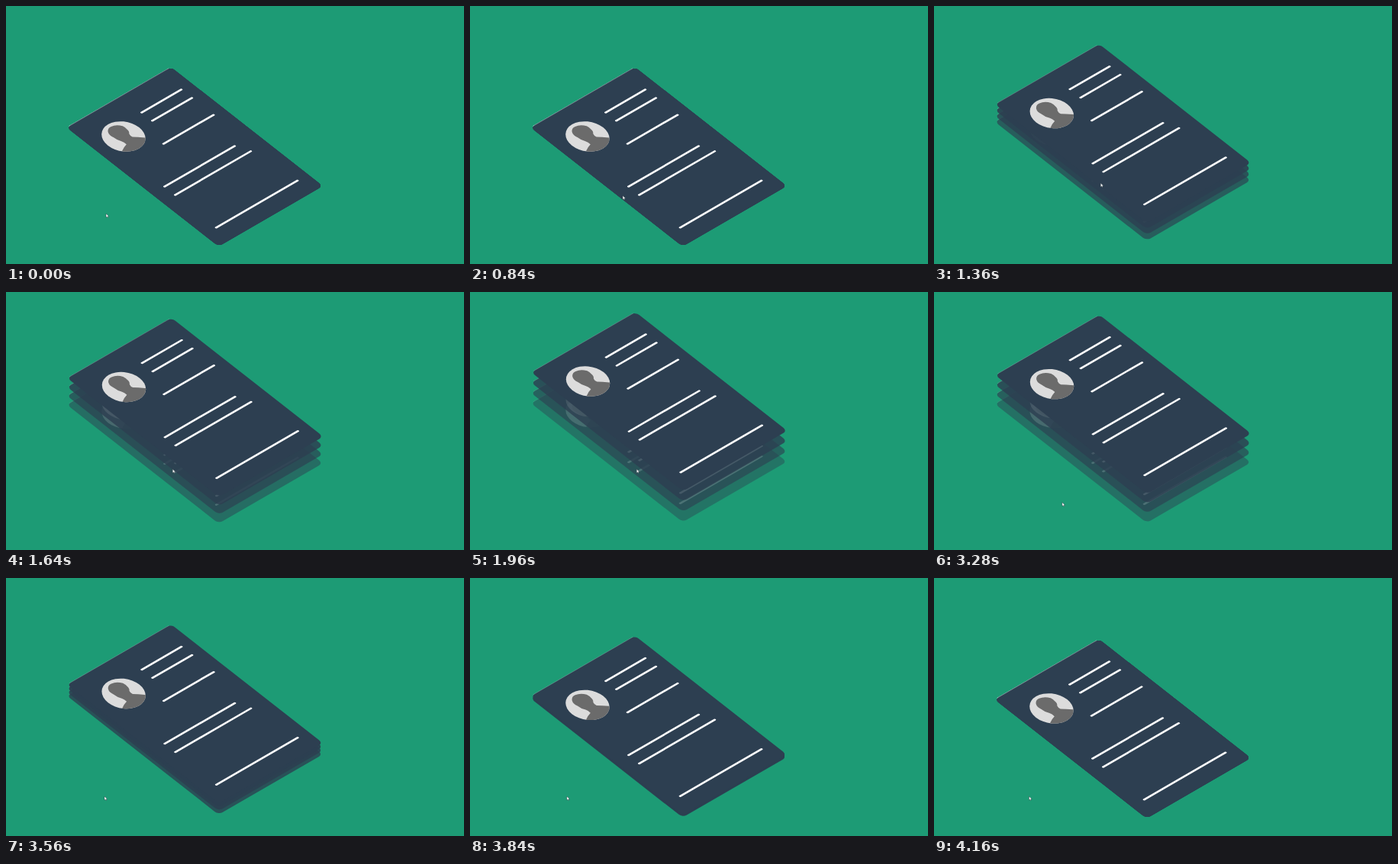
These frames come from a looping animation (600 by 338 pixels, 4.2 s). An HTML page:

```html
<!DOCTYPE html>
<html lang="en">
<head>
<meta charset="utf-8">
<title>Layered card</title>
<style>
  html, body { margin: 0; width: 100%; height: 100%; overflow: hidden; background: #1d9b75; }
  svg { display: block; width: 100%; height: 100%; }
</style>
</head>
<body>
<svg viewBox="0 0 600 338">
  <defs>
    <clipPath id="disc"><circle cx="67.5" cy="81" r="40.5"/></clipPath>
    <g id="card">
      <rect width="270" height="400" rx="10" fill="#2d3f51"/>
      <path d="M6 .2H264" stroke="#fff" stroke-width=".9" opacity=".35"/>
      <circle cx="67.5" cy="81" r="40.5" fill="#dcdcdc"/>
      <path clip-path="url(#disc)" fill="#6b6b6b"
        d="M20 125 37 108Q47 102 57 99.500Q58 92 55.500 88Q51 82 51 72Q48 62 53 55Q59 47 68 48Q80 49 86 60Q88 66 86 74Q85 79 81 82Q78 88 80 92Q87 98 97 107L115 125Z"/>
      <path fill="none" stroke="#fff" stroke-width="4.400" stroke-linecap="round"
        d="M140 55H243M140 83H243M113 140H243M33 224H215M33 252H229M32 361H243"/>
    </g>
  </defs>
  <g id="stack" transform="matrix(.5056 -.2926 .4975 .3895 79.5 159.1)">
    <use href="#card"/><use href="#card"/><use href="#card"/><use href="#card"/>
  </g>
  <path id="cursor" d="M0 0V5L1.200 4 2 5.500 2.800 5.100 2.100 3.700 3.600 3.600Z"
    fill="#fff" stroke="#1c2b33" stroke-width=".4"/>
</svg>
<script>
const LOOP = 4200, STEP = 20.35;
const layers = [...document.querySelectorAll('#stack use')];
const cursor = document.getElementById('cursor');

// time, x, y of the pointer tip
const path = [
  [0, 131, 272], [840, 200, 248.5], [1100, 218.3, 232], [3060, 218.3, 232],
  [3280, 168, 275.5], [3560, 129, 286], [4160, 124.5, 286], [LOOP, 124.5, 286]
];

const clamp = x => Math.min(1, Math.max(0, x));
const bezier = (s, a, b) => 3 * s * (1 - s) ** 2 * a + 3 * s * s * (1 - s) * b + s ** 3;

// The CSS "ease" curve, cubic-bezier(.25, .1, .25, 1)
function ease(x) {
  if (x <= 0 || x >= 1) return clamp(x);
  let lo = 0, hi = 1;
  for (let i = 0; i < 24; i++) {
    const mid = (lo + hi) / 2;
    if (bezier(mid, .25, .25) < x) lo = mid; else hi = mid;
  }
  return bezier(lo, .1, 1);
}

function pointer(t) {
  const i = path.findIndex(k => k[0] > t);
  const [t0, x0, y0] = path[i - 1], [t1, x1, y1] = path[i];
  const s = (t - t0) / (t1 - t0);
  return [x0 + (x1 - x0) * s, y0 + (y1 - y0) * s];
}

function draw(now) {
  const t = now % LOOP;
  const lift = ease((t - 955) / 1280) - ease((t - 3180) / 1010);
  layers.forEach((layer, i) => {
    const d = STEP * (i + 1) * lift;
    layer.setAttribute('transform', `translate(${d} ${-d})`);
    layer.setAttribute('opacity', 1 - .2 * (3 - i) * lift);
  });
  cursor.setAttribute('transform', `translate(${pointer(t)})`);
}

const start = performance.now();
function tick() {
  draw(performance.now() - start);
  requestAnimationFrame(tick);
}
tick();
</script>
</body>
</html>
```
